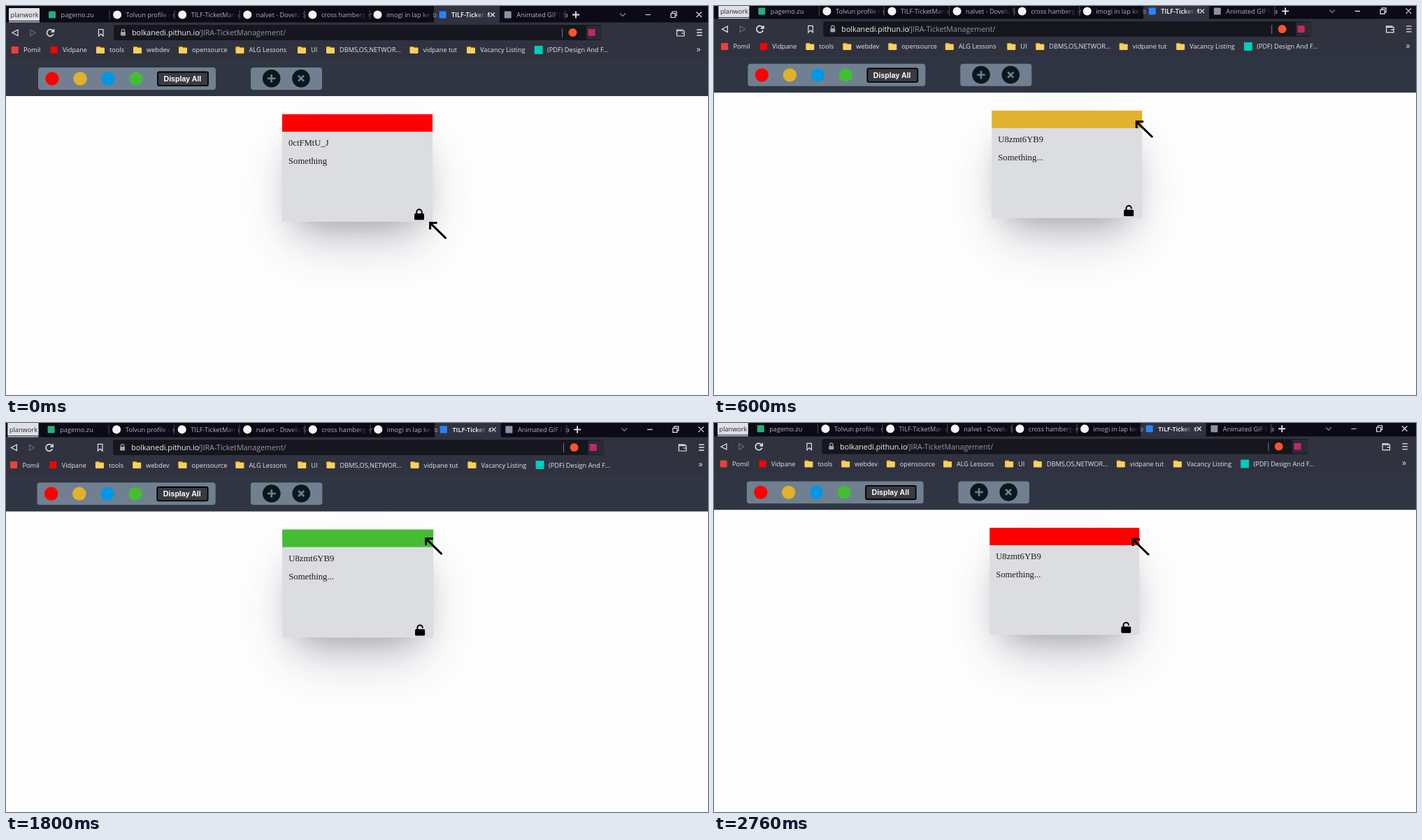
An HTML page for the animation above (3 s loop, 1004x557 px).

```html
<!DOCTYPE html>
<html lang="en">
<head>
<meta charset="utf-8">
<title>Ticket board</title>
<style>
html, body { margin: 0; width: 100%; height: 100%; overflow: hidden; background: #fefefe; }
#scene { position: absolute; left: 0; top: 0; transform-origin: 0 0; }
svg { position: absolute; left: 0; top: 0; overflow: visible; }
text { font: 9.2px "Open Sans", "Noto Sans", sans-serif; white-space: pre; }
.line { fill: none; stroke: #e6e6ea; stroke-width: 1.2; }
#card { position: absolute; left: 395px; top: 154.7px; width: 215px; height: 154.5px; background: #dcdde1;
  box-shadow: rgba(50,50,93,.25) 0 39.5px 79px -15.8px, rgba(0,0,0,.3) 0 23.7px 47.4px -23.7px; }
#band { height: 25.5px; }
#card p { position: absolute; left: 9px; margin: 0; color: #1c1c20;
  font: 12.7px/16px "Liberation Serif", Times, serif; white-space: pre; }
#id { top: 33.5px; }
#task { top: 59px; }
</style>
</head>
<body>
<div id="scene">
  <svg id="chrome" width="1004" height="130"></svg>
  <div id="card">
    <div id="band"></div>
    <p id="id"></p>
    <p id="task"></p>
    <svg width="215" height="155">
      <rect x="189" y="142" width="14" height="9.3" rx="1.5"/>
      <path id="shackle" fill="none" stroke="#000" stroke-width="2"/>
    </svg>
  </div>
</div>
<svg width="1004" height="557">
  <path id="cursor" d="M1.6 11V1.6H11.5M1.6 1.6L24.5 24" fill="none" stroke="#000" stroke-width="3"/>
</svg>
<script>
const $ = id => document.getElementById(id);
const DARK = '#0b0a16', BAR = '#30333f', SLATE = '#708090';
const COLORS = ['#f00', '#e1b12c', '#0097e6', '#44bd32'];

const rect = (x, y, w, h, fill, rx = 0, more = '') =>
  `<rect x="${x}" y="${y}" width="${w}" height="${h}" rx="${rx}" fill="${fill}" ${more}/>`;
const dot = (x, y, r, fill) => `<circle cx="${x}" cy="${y}" r="${r}" fill="${fill}"/>`;
const line = (d, more = '') => `<path class="line" d="${d}" ${more}/>`;
const label = (x, y, s, fill, style = '') => `<text x="${x}" y="${y}" fill="${fill}" style='${style}'>${s}</text>`;
const square = (x, y, fill, s = 10) => rect(x - s / 2, y - s / 2, s, s, fill, 1);
const fade = (id, color) => `<linearGradient id="${id}"><stop offset="0" stop-color="${color}" stop-opacity="0"/>
  <stop offset=".85" stop-color="${color}"/></linearGradient>`;
const folder = (x, y) => rect(x - 6, y - 5, 6, 4, '#e2a92c', 1) + rect(x - 6, y - 3.5, 12, 8.5, '#fbd05a', 1);

function tabs() {
  const list = [
    ['pagemo.zu', '#22b07d'], ['Tolvun profile re', '#f4f4f6', 1], ['TILF-TicketMana', '#f4f4f6', 1],
    ['nalvet - Dovelu S', '#f4f4f6', 1], ['cross hamberger', '#f4f4f6', 1], ['imogi in lap keyb', '#f4f4f6', 1],
    ['TILF-TicketM', '#2684ff'], ['Animated GIF Ma', '#8b93a3']
  ];
  let out = rect(-20, -20, 1044, 43.5, DARK) + rect(612, -20, 94, 44, BAR);
  list.forEach(([name, color, round], i) => {
    const x = 66 + 93.1 * i, active = i == 6, w = active ? 50 : 66;
    out += round ? dot(x, 12.5, 6, color) : square(x, 12.5, color);
    out += label(x + 12.5, 16, name, active ? '#fff' : '#b4b4bc', active ? 'font-weight:600' : '');
    out += rect(x + w - 4, 4, 18, 17, `url(#${active ? 'toBar' : 'toDark'})`);
    if (i != 5 && !active) out += line(`M${x + 82} 6V19`, 'style="stroke:#44444f"');
  });
  return out + line('M693 9.5l6 6m0-6l-6 6') + rect(4, 3, 44, 18, '#dfe0e6', 1) + rect(4, 22, 44, 1.3, '#dfe0e6') +
    label(6.5, 16, 'planwork', '#25252c') +
    line('M810 12.5h10m-5-5v10', 'style="stroke-width:1.8"') + line('M878 10.5l4 4 4-4', 'style="stroke:#8b8b94"') +
    line('M914.5 12.5h7.5M951 10.5h6v6h-6zM953 10v-2h6v6h-2M987.5 8.5l7.5 7.5m0-7.5l-7.5 7.5');
}

function address() {
  const big = 'font-size:10.7px';
  return rect(154, 27, 698, 22, '#15161e', 3) +
    line('M17 34v8.5l-8-4.2z') + line('M35 34v8.5l7-4.2z', 'style="stroke:#666873"') +
    line('M67.5 36a4.8 4.8 0 1 0 .3 4M68.5 33v4h-4', 'style="stroke-width:1.6"') +
    line('M132.5 33.5h6.5v9.5l-3.2-3-3.3 3z') +
    rect(164, 37, 7, 5.5, '#a2a2aa', 1) + line('M165.3 37v-1.5a2.2 2.2 0 0 1 4.4 0v1.5', 'style="stroke:#a2a2aa"') +
    label(180, 42, 'bolkanedi.pithun.io', '#f2f2f4', big) +
    label(275, 42, '/JIRA-TicketManagement/', '#9797a0', big) +
    line('M795.5 32v13', 'style="stroke:#6a6a74"') +
    rect(830, 28, 22, 20, '#292b36', 2) + dot(810.5, 38, 6, '#fb542b') + square(837.5, 38, '#c4285c') +
    line('M959.5 35.5h10.5v7.5h-10.5v-9h9M966 39h4.5') +
    line('M988 34h7.5m-7.5 4h7.5m-7.5 4h7.5', 'style="stroke-width:1.4"');
}

function bookmarks() {
  const list = [
    [25, 'Pomil', '#ea4335'], [81, 'Vidpane', '#f00'], [148, 'tools'], [201, 'webdev'], [266, 'opensource'],
    [347.5, 'ALG Lessons'], [436, 'UI'], [477, 'DBMS,OS,NETWOR...'], [596.5, 'vidpane tut'],
    [678, 'Vacancy Listing'], [774, '(PDF) Design And F...', '#00ccbb', 12]
  ];
  return list.map(([x, name, color, size]) =>
    (color ? square(x - 12.3, 63, color, size) : folder(x - 13, 63)) + label(x, 66.4, name, '#e6e6ea')
  ).join('') + label(987.5, 66, '»', '#e6e6ea', 'font-size:12px');
}

function toolbar() {
  const bold = 'font:bold 10.6px "Liberation Sans",Arial,sans-serif';
  const sign = `style="stroke:${SLATE};stroke-width:2.6"`;
  return rect(-20, 77, 1044, 52, '#2f3542') +
    rect(46, 88, 254, 32, SLATE, 4) + rect(350, 88, 102, 32, SLATE, 4) +
    COLORS.map((c, i) => dot(66 + 40 * i, 104, 9.7, c)).join('') +
    rect(217, 94.5, 72, 19.5, '#3a3a41', 2, 'stroke="#000" stroke-width="1.8"') +
    label(225.5, 107.8, 'Display All', '#fff', bold) +
    dot(379.7, 103.7, 12.8, '#0a181d') + dot(422, 103.7, 12.8, '#0a181d') +
    line('M373.9 103.7h11.6m-5.8-5.8v11.6', sign) + line('M418 99.7l8 8m0-8l-8 8', sign);
}

$('chrome').innerHTML = `<defs>${fade('toDark', DARK)}${fade('toBar', BAR)}</defs>` +
  rect(-20, -20, 1044, 149, BAR) + tabs() + address() + bookmarks() + toolbar();

// Each step: page shift x, y and zoom, pointer x, y, band colour
const STEP = 600;
const steps = [
  [0, 0, 1, 605, 309, 0],
  [2.4, -5.1, .9997, 602.7, 164, 1],
  [1.7, -4.1, .9965, 591, 160.5, 2],
  [-1.7, -3.2, 1.0047, 599, 164, 3],
  [1.1, -4.2, .9953, 597.5, 165, 0]
];

let shown = -1;
function draw(now) {
  requestAnimationFrame(draw);
  const n = Math.floor(now / STEP) % steps.length;
  if (n == shown) return;
  shown = n;
  const [x, y, zoom, px, py, color] = steps[n], locked = n == 0;
  $('scene').style.transform = `translate(${x}px,${y}px) scale(${zoom})`;
  $('cursor').setAttribute('transform', `translate(${px},${py})`);
  $('band').style.background = COLORS[color];
  $('id').textContent = locked ? '0ctFMtU_J' : 'U8zmt6YB9';
  $('task').textContent = locked ? 'Something' : 'Something...';
  $('shackle').setAttribute('d', 'M192.3 143v-3a3.7 3.7 0 0 1 7.4 0v' + (locked ? 3 : .6));
}
draw(0);
</script>
</body>
</html>
```
